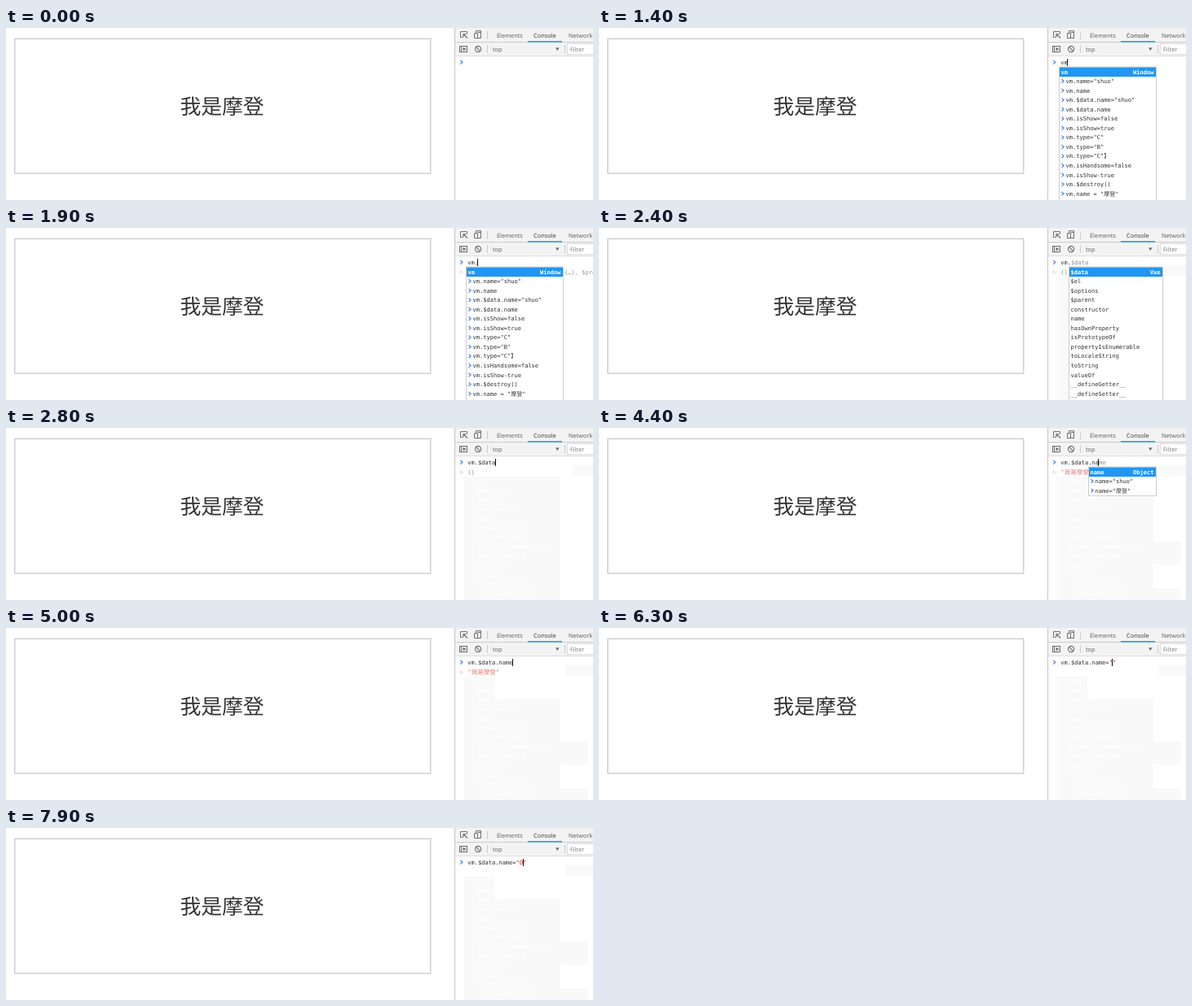
Write an HTML page with a canvas that moves like this. It is 720 px wide and 212 px high and loops after 8000 ms.

```html
<!DOCTYPE html>
<html lang="zh-CN">
<head>
<meta charset="utf-8">
<title>Console</title>
<style>
html, body { margin: 0; width: 100%; height: 100%; overflow: hidden; background: #fff; }
canvas { display: block; }
</style>
</head>
<body>
<canvas id="stage" width="720" height="212"></canvas>
<script>
const ctx = document.getElementById('stage').getContext('2d');
ctx.textRendering = 'geometricPrecision';

const LOOP = 8000, PITCH = 4.25, ROW = 11.55, CODE_X = 566.2;
const MONO = '7.06px "DejaVu Sans Mono", "Noto Sans CJK SC", monospace';
const UI = '7.4px "Open Sans", sans-serif';
const BLUE = '#2196f3', RED = '#c8201c', DARK = '#303030';

// Popup rows starting with ">" come from the command history.
const history = {
  x: 564.5, y: 48, w: 119, type: 'Window',
  rows: ['vm', '>vm.name="shuo"', '>vm.name', '>vm.$data.name="shuo"', '>vm.$data.name',
    '>vm.isShow=false', '>vm.isShow=true', '>vm.type="C"', '>vm.type="B"', '>vm.type="C"】',
    '>vm.isHandsome=false', '>vm.isShow-true', '>vm.$destroy()', '>vm.name = "摩登"']
};
const proto = ['hasOwnProperty', 'isPrototypeOf', 'propertyIsEnumerable', 'toLocaleString',
  'toString', 'valueOf', '__defineGetter__', '__defineSetter__'];
const members = {
  x: 576.5, y: 48, w: 115, type: 'Vue',
  rows: ['$data', '$el', '$options', '$parent', 'constructor', 'name', ...proto]
};
const fields = {
  x: 601.5, y: 48, w: 113, type: 'Object',
  rows: ['name', 'constructor', ...proto, '__lookupGetter__', '__lookupSetter__',
    '__proto__', '>name="shuo"']
};
const matches = {
  x: 600.5, y: 48, w: 83, type: 'Object',
  rows: ['name', '>name="shuo"', '>name="摩登"']
};
const above = { x: 622.5, y: 24, w: 61, type: '', rows: ['>"shuo"'] };

const OBJECT = 'Vue {_isVue: true, options: {…}, $pro', VALUE = '"我是摩登"';

// Each step changes part of the state; back = caret offset from the end.
const steps = [
  [0, { code: '', hint: '', caret: false, back: 0, popup: null, result: '', trace: 0 }],
  [500, { caret: true }],
  [1000, { caret: false }],
  [1300, { code: 'v', caret: true }],
  [1400, { code: 'vm', popup: history }],
  [1500, { result: OBJECT }],
  [1900, { code: 'vm.' }],
  [2000, { popup: members, hint: '$data', trace: 1 }],
  [2100, { result: '{}' }],
  [2400, { caret: false }],
  [2800, { code: 'vm.$data', hint: '', caret: true, popup: null }],
  [3300, { caret: false }],
  [3800, { code: 'vm.$data.', caret: true }],
  [3900, { popup: fields, hint: 'name' }],
  [4000, { result: VALUE }],
  [4300, { code: 'vm.$data.n', hint: 'ame' }],
  [4400, { code: 'vm.$data.na', hint: 'me', popup: matches, trace: 2 }],
  [4800, { caret: false }],
  [5000, { code: 'vm.$data.name', hint: '', caret: true, popup: null }],
  [5400, { caret: false }],
  [5600, { code: 'vm.$data.name=', hint: '"shuo"', caret: true, popup: above, result: '' }],
  [6000, { code: 'vm.$data.name="', hint: 'shuo"' }],
  [6100, { code: 'vm.$data.name=""', hint: '', popup: null }],
  [6300, { back: 1 }],
  [6800, { code: 'vm.$data.name="D"' }],
  [7300, { code: 'vm.$data.name="DE"' }],
  [7700, { caret: false }],
  [7900, { code: 'vm.$data.name="D"', caret: true }]
];

function rect(x, y, w, h, color) {
  ctx.fillStyle = color;
  ctx.fillRect(x, y, w, h);
}

function frame(x, y, w, h, color, width = 1) {
  ctx.strokeStyle = color;
  ctx.lineWidth = width;
  ctx.strokeRect(x, y, w, h);
}

function text(str, x, y, color, font = MONO, align = 'left') {
  ctx.font = font;
  ctx.textAlign = align;
  ctx.fillStyle = color;
  ctx.fillText(str, x, y);
}

function path(d, color, width = 1) {
  ctx.strokeStyle = color;
  ctx.lineWidth = width;
  ctx.stroke(new Path2D(d));
}

function chevron(x, y, color) {
  path(`M${x} ${y - 2.3}l2.6 2.3l-2.6 2.3`, color, 1.1);
}

function drawPage() {
  rect(0, 0, 720, 212, '#fff');
  frame(10.75, 13.25, 510, 166, '#ccc', 1.4);
  text('我是摩登', 265, 105.5, '#333', '25.8px "Noto Sans CJK SC", sans-serif', 'center');
}

function drawToolbars() {
  rect(551, 0, 169, 34, '#f3f3f3');
  rect(550, 0, 1, 212, '#c4c4c4');
  rect(551, 17, 169, 1, '#ccc');
  rect(551, 34, 169, 1, '#ddd');
  rect(640, 16, 42, 1.5, '#03a9f4');
  text('Elements', 602, 11.5, '#5a5a5a', UI);
  text('Console', 647, 11.5, '#333', UI);
  text('Network', 690, 11.5, '#5a5a5a', UI);

  const icon = '#6e6e6e';
  path('M560.5 11.5h-3v-7h8v3', icon);
  path('M561 7.5l5 5M561 11v-3.5h3.5', icon, 1.2);
  path('M576.5 6v-2.5h6v2M578.5 12.5h4v-7h-4M574.5 6.5h4v6h-4z', icon);
  frame(556.5, 22.5, 9, 7, icon);
  path('M558.5 22.5v7', icon);
  ctx.fillStyle = icon;
  ctx.fill(new Path2D('M560.5 23.8l4 2.2l-4 2.2zM674 24.3h4.6l-2.3 3.8z'));
  path('M575.5 26a3.6 3.6 0 1 0 7.2 0a3.6 3.6 0 1 0 -7.2 0M576.6 23.4l5 5.2', icon, 1.1);

  rect(590, 4, 1, 10, '#ccc');
  rect(590, 21, 1, 10, '#ccc');
  rect(685, 21, 1, 10, '#ccc');
  text('top', 597, 28.7, '#5a5a5a', UI);
  rect(689, 20, 31, 13, '#fff');
  frame(688.5, 19.5, 40, 13, '#ddd');
  text('Filter', 692, 29.2, '#777', UI);
}

// Faint trace that closed popups leave on the panel.
function drawTrace(level) {
  if (!level) return;
  const tint = '#f9f9f9';
  rect(561, 60, 119, 152, tint);
  rect(level > 1 ? 686 : 694, 46, 34, 13, tint);
  members.rows.forEach((row, i) => i && text(row, 578.5, 56.5 + i * ROW, '#fff'));
  if (level > 1) {
    rect(680, 140, 34, 28, tint);
    rect(680, 198, 34, 14, tint);
    rect(599, 47, 87, 40, '#fff');
  }
}

function drawPopup({ x, y, w, type, rows }) {
  const h = rows.length * ROW + (rows.length > 10 ? 6 : 1);
  rect(x, y, w, h, '#fff');
  frame(x, y, w, h, '#ccc');
  rect(x + .5, y + .5, w - 1, ROW, BLUE);
  rows.forEach((row, i) => {
    const cy = y + 6 + i * ROW, past = row[0] === '>';
    const font = i ? MONO : 'bold ' + MONO;
    if (past) chevron(x + 3, cy, i ? '#367cf1' : '#fff');
    text(past ? row.slice(1) : row, x + (past ? 8 : 2), cy + 2.5, i ? DARK : '#fff', font);
  });
  text(type, x + w - 3, y + 8.5, '#fff', 'bold ' + MONO, 'right');
}

function drawConsole({ code, hint, caret, back, popup, result, trace }) {
  drawTrace(trace);
  chevron(557.3, 42.3, '#367cf1');
  const at = n => CODE_X + n * PITCH;
  const [plain] = code.split('"');
  text(plain, CODE_X, 44.7, DARK);
  text(code.slice(plain.length), at(plain.length), 44.7, RED);
  text(hint, at(code.length), 44.7, '#888');
  if (result) {
    path('M559 52.3l-2 2l2 2', '#bbb', .9);
    rect(560, 53.8, 1, 1, '#bbb');
    text(result, CODE_X, 56.7, result === VALUE ? '#de7876' : '#999',
      result === VALUE ? MONO.replace('7.06', '7.5') : MONO);
  }
  if (popup) drawPopup(popup);
  if (caret) rect(Math.floor(at(code.length - back)), 38, 1, 9, '#111');
}

function draw() {
  const time = performance.now() % LOOP, state = {};
  for (const [start, change] of steps) if (start <= time) Object.assign(state, change);
  drawPage();
  drawToolbars();
  drawConsole(state);
  requestAnimationFrame(draw);
}
draw();
</script>
</body>
</html>
```
